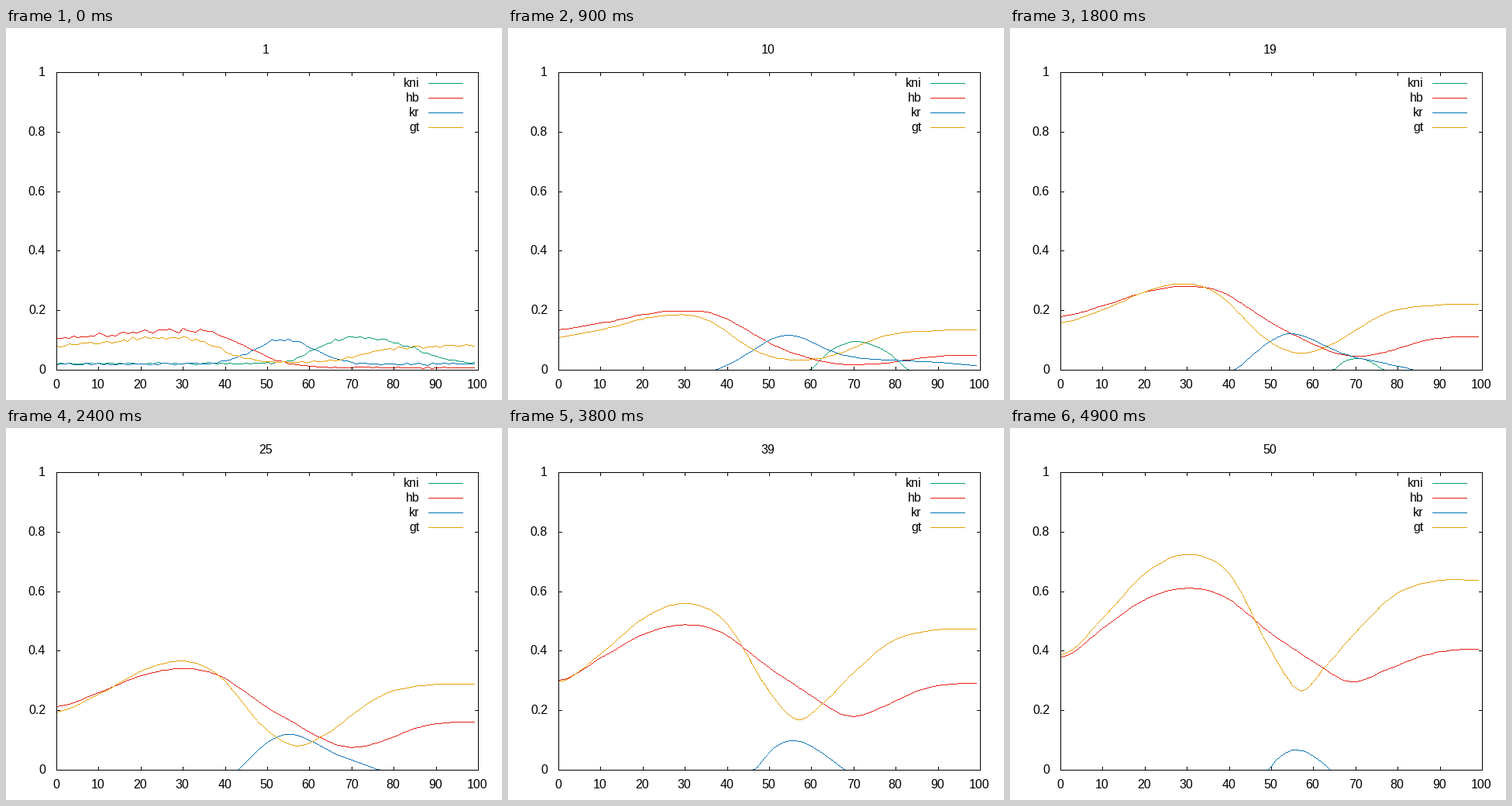
A matplotlib script for the animation above (5 s loop, 640 by 480 pixels).

```python
import numpy as np
import matplotlib.pyplot as plt
from matplotlib.animation import FuncAnimation

DPI = 80
PX = 72 / DPI  # points per pixel
LEFT, RIGHT, TOP, BOTTOM = 65, 609, 57, 441
STEPS = 50
CELLS = np.arange(100)

plt.rcParams.update({"font.family": "Liberation Sans", "font.size": 16 * PX})


def sigmoid(z):
    return 1 / (1 + np.exp(-z))


def bump(center, width):
    return np.exp(-(((CELLS - center) / width) ** 2) / 2)


def smooth_through(points):
    """Cubic Hermite curve through the points, flat at both ends."""
    xs, ys = np.array(points).T
    slopes = np.gradient(ys, xs)
    slopes[[0, -1]] = 0
    i = np.clip(np.searchsorted(xs, CELLS, "right") - 1, 0, len(xs) - 2)
    h = xs[i + 1] - xs[i]
    u = (CELLS - xs[i]) / h
    return ((1 + 2 * u) * (1 - u) ** 2 * ys[i]
            + u * (1 - u) ** 2 * h * slopes[i]
            + u * u * (3 - 2 * u) * ys[i + 1]
            + u * u * (u - 1) * h * slopes[i + 1])


def growing(start, end, pace, valley):
    """Levels that rise to the end profile, latest around the valley."""
    power = pace + 0.16 * (1 - bump(30, 14)) + 0.7 * bump(valley, 7.5)
    return start, lambda s: (end - start) * s ** power


def fading(start, gain, loss):
    """Levels that first follow the gain, then sink under the loss."""
    return start, lambda s: gain * s - loss * s * s


GENES = {
    "kni": ("#009e73", fading(
        0.022 + 0.09 * sigmoid((CELLS - 61) / 2.8) * sigmoid((86 - CELLS) / 4),
        np.maximum(0.03 - 0.0023 * (CELLS - 70) ** 2, -0.35),
        0.6)),
    "hb": ("#e51e10", growing(
        0.008 + (0.096 + 0.0012 * CELLS) * sigmoid((44.5 - CELLS) / 4.5),
        smooth_through([(0, 0.379), (10, 0.476), (20, 0.573), (29, 0.611),
                        (38, 0.59), (50, 0.458), (60, 0.364), (69, 0.296),
                        (77, 0.335), (86, 0.385), (99, 0.407)]),
        pace=1.17, valley=71)),
    "kr": ("#0072b2", fading(
        0.02 + 0.083 * bump(54, 7),
        0.002 * CELLS - 0.22 * sigmoid((39.5 - CELLS) / 4),
        0.14 + 0.0006 * (CELLS - 56) ** 2)),
    "gt": ("#e69f00", growing(
        0.025 + (0.053 + 0.0013 * CELLS) * sigmoid((38 - CELLS) / 3.5)
        + 0.057 * sigmoid((CELLS - 73) / 4),
        smooth_through([(0, 0.387), (10, 0.51), (20, 0.659), (30, 0.725),
                        (40, 0.659), (50, 0.398), (57, 0.267), (63, 0.352),
                        (70, 0.463), (80, 0.596), (89, 0.637), (99, 0.638)]),
        pace=1.22, valley=57)),
}

rng = np.random.RandomState(4)
NOISE = {name: rng.normal(size=100) * (0.001 + 0.025 * start)
         for name, (_, (start, _)) in GENES.items()}


def diffuse(signal, times):
    for _ in range(times):
        padded = np.pad(signal, 1, mode="edge")
        signal = (padded[:-2] + 2 * padded[1:-1] + padded[2:]) / 4
    return signal


def levels(name, frame):
    _, (start, change) = GENES[name]
    curve = start + change(frame / (STEPS - 1))
    return np.maximum(curve + diffuse(NOISE[name], frame), 0)


def to_x(cell):
    return np.round(LEFT + (RIGHT - LEFT) * cell / 100)


def to_y(level):
    return np.round(BOTTOM - (BOTTOM - TOP) * level)


def stroke(xs, ys, color="black"):
    ax.plot(xs, ys, color=color, lw=PX, zorder=5,
            solid_capstyle="projecting", solid_joinstyle="miter")


def label(x, y, text, align):
    return ax.text(x, y, text, ha=align, va="baseline")


fig = plt.figure(figsize=(640 / DPI, 480 / DPI), dpi=DPI, facecolor="white")
ax = fig.add_axes([0, 0, 1, 1])
ax.set_xlim(0, 640)
ax.set_ylim(480, 0)
ax.axis("off")

stroke([LEFT, RIGHT, RIGHT, LEFT, LEFT], [TOP, TOP, BOTTOM, BOTTOM, TOP])
for tick in range(0, 101, 10):
    x = to_x(tick)
    stroke([x, x], [BOTTOM, BOTTOM - 4])
    stroke([x, x], [TOP, TOP + 4])
    label(x - 0.5, 465, str(tick), "center")
for tick in range(0, 11, 2):
    y = to_y(tick / 10)
    stroke([LEFT, LEFT + 4], [y, y])
    stroke([RIGHT, RIGHT - 4], [y, y])
    label(51, y + 5, f"{tick / 10:g}", "right")
title = label(335.5, 33, "", "center")

# Curves are hard-edged: one filled bar for each pixel column.
columns = np.arange(LEFT, to_x(CELLS[-1]) + 1)
edges = np.append(columns, columns[-1] + 1)
curves = {}
for row, (name, (color, _)) in enumerate(GENES.items()):
    y = 71 + 19 * row
    label(533.5, y + 5, name, "right")
    stroke([545, 589], [y, y], color)
    blank = np.zeros(len(columns))
    curves[name] = ax.stairs(blank, edges, baseline=blank, fill=True,
                             color=color, zorder=3)


def update(frame):
    title.set_text(str(frame + 1))
    for name, curve in curves.items():
        ys = np.interp(columns, to_x(CELLS), to_y(levels(name, frame)))
        reach = np.maximum(np.abs(np.gradient(ys)) - 1, 0) / 2
        curve.set_data(values=np.round(ys + reach) + 1, edges=edges,
                       baseline=np.round(ys - reach))
    return [title, *curves.values()]


anim = FuncAnimation(fig, update, frames=STEPS, interval=100,
                     repeat=True, repeat_delay=0, blit=False)
plt.show()
```
